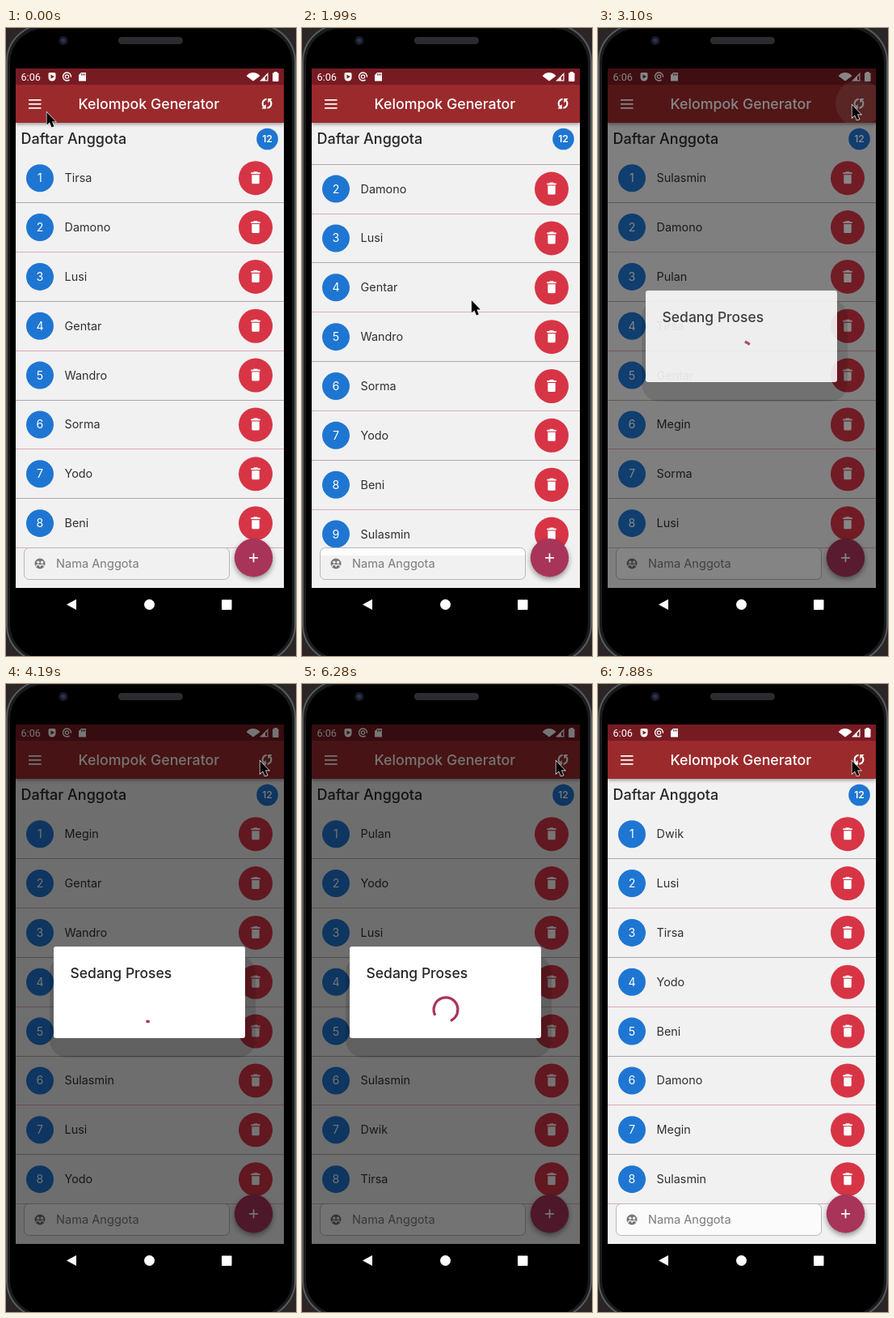
An HTML page with a canvas for the animation above (8 s loop, 359 by 775 pixels).

```html
<!DOCTYPE html>
<html lang="id">
<head>
<meta charset="utf-8">
<title>Kelompok Generator</title>
<style>
html, body { margin: 0; width: 100%; height: 100%; overflow: hidden; background: #000; }
canvas { display: block; width: 359px; height: 775px; }
</style>
</head>
<body>
<canvas id="stage"></canvas>
<script>
const W = 359, H = 775, LOOP = 8000, ROW = 60.85, TAU = Math.PI * 2;
const SHUFFLE_START = 3010, SHUFFLE_STEP = 90.5, SHUFFLE_END = 7500;
const BLUE = '#1e76d2', RED = '#d73545', PINK = '#a93459', PAPER = '#f1f1f1';
const canvas = document.getElementById('stage');
const ctx = canvas.getContext('2d');
const ratio = window.devicePixelRatio || 1;
canvas.width = W * ratio;
canvas.height = H * ratio;

const names = 'Tirsa Damono Lusi Gentar Wandro Sorma Yodo Beni Sulasmin Pulan Megin Dwik'.split(' ');
const result = 'Dwik Lusi Tirsa Yodo Beni Damono Megin Sulasmin Gentar Wandro Sorma Pulan'.split(' ');

// Pointer stops: time, x, y
const pointer = [[0, 50, 104], [430, 86, 411], [520, 86, 411], [1260, 159, 243],
  [1410, 171, 210], [1510, 171, 210], [1850, 195, 385], [2340, 281, 92], [2660, 314, 95]];

const ramp = (t, from, to) => Math.min(1, Math.max(0, (t - from) / (to - from)));
const smooth = x => x * x * (3 - 2 * x);
const easeOut = x => 1 - (1 - x) ** 2;

function pointerAt(t) {
  const i = pointer.findIndex(stop => stop[0] > t);
  if (i < 0) return pointer[pointer.length - 1].slice(1);
  const [t0, x0, y0] = pointer[i - 1], [t1, x1, y1] = pointer[i];
  const f = ramp(t, t0, t1);
  return [x0 + (x1 - x0) * f, y0 + (y1 - y0) * f];
}

function fastOutSlowIn(x) {
  if (x <= 0) return 0;
  if (x >= 1) return 1;
  let lo = 0, hi = 1;
  for (let i = 0; i < 20; i++) {
    const m = (lo + hi) / 2, n = 1 - m;
    if (1.2 * n * n * m + 0.6 * n * m * m + m * m * m < x) lo = m; else hi = m;
  }
  return 3 * (1 - lo) * lo * lo + lo ** 3;
}

function shuffled(seed) {
  const order = names.slice();
  for (let i = order.length - 1; i > 0; i--) {
    seed = (seed * 16807 + 11) % 2147483647;
    const j = seed % (i + 1);
    [order[i], order[j]] = [order[j], order[i]];
  }
  return order;
}

// The picture refreshes in steps: quick while scrolling, slower while shuffling.
function stepped(now) {
  if (now < SHUFFLE_START) return Math.floor(now / 84) * 84;
  return SHUFFLE_START + Math.floor((now - SHUFFLE_START) / SHUFFLE_STEP) * SHUFFLE_STEP;
}

function orderAt(t) {
  if (t < SHUFFLE_START) return names;
  return t < SHUFFLE_END ? shuffled(Math.round(t * 7919)) : result;
}

function rect(x, y, w, h, color) {
  ctx.fillStyle = color;
  ctx.fillRect(x, y, w, h);
}

function disc(x, y, r, color) {
  ctx.fillStyle = color;
  ctx.beginPath();
  ctx.arc(x, y, r, 0, TAU);
  ctx.fill();
}

function round(x, y, w, h, r, fill, line, width = 1) {
  ctx.beginPath();
  ctx.roundRect(x, y, w, h, r);
  if (fill) { ctx.fillStyle = fill; ctx.fill(); }
  if (line) { ctx.strokeStyle = line; ctx.lineWidth = width; ctx.stroke(); }
}

function poly(color, ...points) {
  ctx.fillStyle = color;
  ctx.beginPath();
  for (let i = 0; i < points.length; i += 2) ctx.lineTo(points[i], points[i + 1]);
  ctx.closePath();
  ctx.fill();
}

function arc(x, y, r, from, to, color, width) {
  ctx.strokeStyle = color;
  ctx.lineWidth = width;
  ctx.beginPath();
  ctx.arc(x, y, r, from, to);
  ctx.stroke();
}

function text(str, x, y, size, color, weight = 400, align = 'left', family = 'Inter') {
  ctx.font = `${weight} ${size}px ${family}, sans-serif`;
  ctx.textAlign = align;
  ctx.fillStyle = color;
  ctx.fillText(str, x, y);
}

function isolated(draw) {
  ctx.save();
  draw();
  ctx.restore();
}

function withShadow(blur, dy, alpha, draw) {
  isolated(() => {
    ctx.shadowColor = `rgba(0,0,0,${alpha})`;
    ctx.shadowBlur = blur * ratio;
    ctx.shadowOffsetY = dy * ratio;
    draw();
  });
}

function clipTo(x, y, w, h) {
  ctx.beginPath();
  ctx.rect(x, y, w, h);
  ctx.clip();
}

function drawPhone() {
  rect(0, 0, W, H, '#2b2625');
  round(1, -4, W - 2, 786, 46, '#1a1b1e', '#565a60', 2);
  round(5, 1, W - 10, 777, 42, '#000');
  round(139, 11, 80, 9, 4.5, '#2b2c2f');
  disc(71, 15.5, 5.5, '#191b27');
  disc(71, 15.5, 2.5, '#303552');
  poly('#fff', 75, 711.5, 87, 705, 87, 718);
  disc(177.5, 711.5, 6.5, '#fff');
  round(267, 705.5, 12.5, 12.5, 1, '#fff');
}

function drawStatusBar() {
  const bar = '#771b23';
  rect(12, 50, 332, 20, bar);
  text('6:06', 18.5, 64.5, 12.6, '#fff', 400, 'left', 'Roboto');
  round(52.5, 55, 9, 10.5, [2, 2, 5, 5], '#fff');
  poly(bar, 55.5, 57.5, 60, 60, 55.5, 62.5);
  arc(75.5, 60, 5, 0.9, 6.4, '#fff', 1.4);
  arc(75.5, 60, 2.2, 0, TAU, '#fff', 1.2);
  poly('#fff', 93, 55, 99, 55, 99, 65.5, 90, 65.5, 90, 58);
  for (let x = 93; x < 98; x += 2) rect(x, 56.2, 1, 2.4, bar);
  ctx.fillStyle = '#fff';
  ctx.beginPath();
  ctx.moveTo(306, 65.5);
  ctx.arc(306, 65.5, 10.5, -2.5, -0.64);
  ctx.fill();
  poly('#fff', 314, 65.5, 324.5, 55, 324.5, 65.5);
  poly(bar, 321, 60.5, 323.3, 58.2, 323.3, 64.3, 321, 64.3);
  round(330, 55.2, 7.5, 10.8, 1, '#fff');
  rect(332, 54, 3.5, 2, '#fff');
}

function drawSyncIcon(x, y) {
  for (const half of [0, Math.PI]) isolated(() => {
    ctx.translate(x, y);
    ctx.rotate(half + 0.75);
    arc(0, 0, 5.4, -1.45, 0.75, '#fff', 2.2);
    poly('#fff', 0.6, -9, 0.6, -1.6, -3.6, -5.3);
  });
}

function drawAppBar(ripple) {
  withShadow(4, 2, 0.35, () => rect(12, 70, 332, 47, '#9b2a2c'));
  drawStatusBar();
  for (const y of [88, 93, 98]) rect(28, y, 15.5, 1.7, '#fff');
  text('Kelompok Generator', 89.5, 99.5, 17.8, '#fff', 500);
  if (ripple) isolated(() => {
    clipTo(12, 50, 332, 67);
    disc(323, 93, 29, 'rgba(255,255,255,.13)');
  });
  drawSyncIcon(323, 93.3);
}

function drawRow(index, name, y) {
  disc(42, y, 17, BLUE);
  text(index + 1, 42, y + 5, 14.2, '#fff', 400, 'center');
  text(name, 72.5, y + 5, 14.4, '#303030');
  disc(309, y, 21, RED);
  round(304.3, y - 4, 9.4, 11, [0, 0, 1.5, 1.5], '#fff');
  rect(303.3, y - 7, 11.4, 1.9, '#fff');
  rect(306.5, y - 8, 5, 1.5, '#fff');
  rect(12, Math.round(y + 30), 332, 1, index % 2 ? '#dbaab8' : '#b0a5aa');
}

function drawList(order, scroll, glow) {
  isolated(() => {
    clipTo(12, 159, 332, 492);
    order.forEach((name, i) => drawRow(i, name, 185.2 + i * ROW - scroll));
    if (!glow) return;
    ctx.fillStyle = 'rgba(150,50,80,.09)';
    ctx.beginPath();
    ctx.ellipse(165, 655, 215, 22, 0, 0, TAU);
    ctx.fill();
  });
}

function drawField(t) {
  round(22.5, 641.5, 254, 39, 6, t >= SHUFFLE_START ? '#fbfbfb' : PAPER);
  if (t > 1170 && t < SHUFFLE_START) round(23, 642, 253, 9, [5, 5, 0, 0], '#fdfdfd');
  round(22.5, 641.5, 254, 39, 6, null, '#b9b7b8');
  disc(42, 661, 6.5, '#777');
  for (const x of [39.8, 44.6]) {
    disc(x, 659.2, 1.7, '#eee');
    arc(x, 665, 2.6, Math.PI, TAU, '#eee', 1.1);
  }
  text('Nama Anggota', 62, 666, 14.6, '#7b7b7b');
}

function drawFab() {
  withShadow(6, 3, 0.4, () => disc(306.5, 653.7, 23.7, PINK));
  rect(301, 653, 11, 1.7, '#fff');
  rect(305.65, 648.3, 1.7, 11, '#fff');
}

function drawSpinner(t) {
  const run = Math.max(0, 90 + (t - 3100) * 1.045);
  const phase = run / 1333 % 1;
  const head = fastOutSlowIn(phase * 2), tail = fastOutSlowIn(phase * 2 - 1);
  const start = -Math.PI / 2 + tail * 1.5 * Math.PI + run / 2222 * TAU + phase * Math.PI / 2;
  ctx.lineCap = 'square';
  arc(178, 401.8, 14.9, start, start + Math.max((head - tail) * 1.5 * Math.PI, 0.001), PINK, 3.2);
}

function drawDialog(t, alpha) {
  rect(12, 50, 332, 641, `rgba(0,0,0,${0.54 * alpha})`);
  isolated(() => {
    ctx.globalAlpha = alpha;
    round(54, 335, 255, 126, 22, 'rgba(0,0,0,.13)');
    round(59, 324, 237, 113, 3, '#fff');
    text('Sedang Proses', 79.5, 362.5, 17.5, '#262626', 500);
    drawSpinner(t);
  });
}

function drawCursor([x, y]) {
  isolated(() => {
    ctx.translate(x, y);
    const outline = new Path2D('M.5 0V15.5L4 12.5L6.5 18.5L9.5 17.5L7 11.5H11.5Z');
    ctx.strokeStyle = '#fff';
    ctx.lineWidth = 1.3;
    ctx.stroke(outline);
    ctx.fillStyle = '#000';
    ctx.fill(outline);
  });
}

function render(now) {
  const t = stepped(now);
  const scroll = 240.8 * (smooth(ramp(t, 520, 1180)) - smooth(ramp(t, 1510, 2100)));
  const dialog = easeOut(ramp(t, 2970, 3170)) - smooth(ramp(t, 7500, 7800));
  ctx.setTransform(ratio, 0, 0, ratio, 0, 0);
  drawPhone();
  rect(12, 117, 332, 574, PAPER);
  drawList(orderAt(t), scroll, t > 1170 && t < 1510);
  text('Daftar Anggota', 18.5, 143, 18, '#262626', 500);
  disc(323.5, 137, 13.3, BLUE);
  text('12', 323.5, 141.3, 12, '#fff', 600, 'center');
  drawAppBar(now >= 2820 && now < 3190);
  drawField(t);
  drawFab();
  if (dialog > 0) drawDialog(t, dialog);
  drawCursor(pointerAt(t));
}

const began = performance.now();
function loop() {
  render((performance.now() - began) % LOOP);
  requestAnimationFrame(loop);
}
loop();
</script>
</body>
</html>
```
